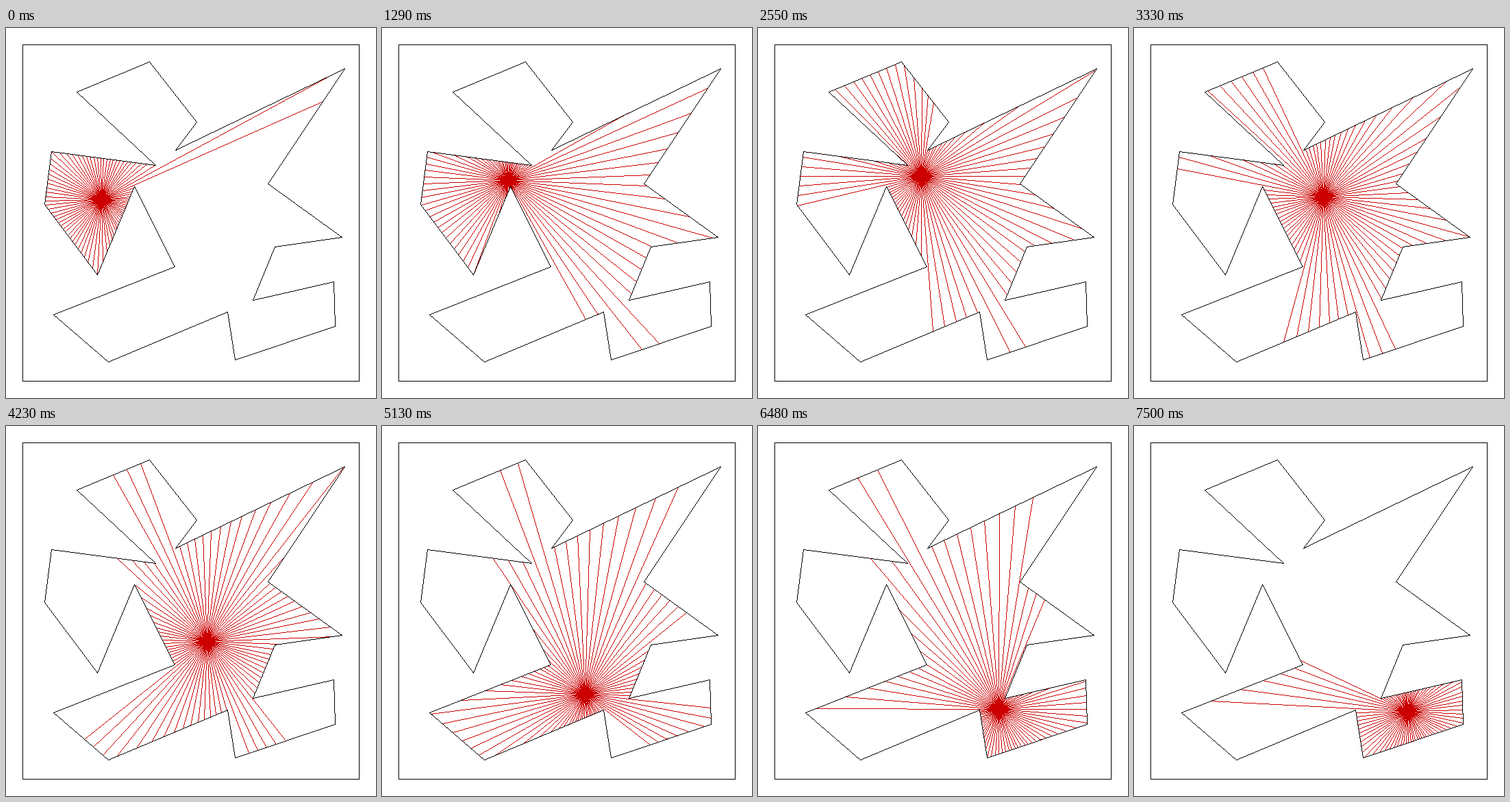
A matplotlib script that plays this animation: 540x540 px, repeating every 7.53 s.

```python
import numpy as np
import matplotlib.pyplot as plt
from matplotlib.animation import FuncAnimation

SIZE, DPI = 540, 100
FRAMES, INTERVAL = 251, 30
RAYS = 80
WHITE, BLACK, RED = (255, 255, 255), (0, 0, 0), (204, 0, 0)

# Corners of the room; the sweep of rays starts toward the first one
ROOM = np.array([
    (133, 360), (56, 257), (66, 180), (218, 200), (103, 93), (209, 49),
    (278, 137), (247, 178), (494, 59), (382, 227), (490, 305), (392, 319),
    (360, 397), (478, 370), (480, 435), (334, 484), (323, 414), (149, 487),
    (69, 418), (246, 348), (187, 231)], float)
EDGES = np.roll(ROOM, -1, axis=0) - ROOM
BORDER = np.array([(24, 24), (515, 24), (515, 515), (24, 515)])

# Key points of the light, evenly spaced in time
WAY = np.array([(139, 250), (182.5, 222.5), (236, 215), (290.5, 271),
                (293, 384.5), (341, 410.5), (399, 416)])
SLOPE = np.gradient(WAY, axis=0)


def cross(a, b):
    return a[..., 0] * b[..., 1] - a[..., 1] * b[..., 0]


def light(frame):
    """Position on a Catmull-Rom curve through the key points."""
    u = frame / (FRAMES - 1) * (len(WAY) - 1)
    i = min(int(u), len(WAY) - 2)
    s = u - i
    blend = s * s * (3 - 2 * s)
    return (WAY[i] * (1 - blend) + WAY[i + 1] * blend
            + s * (1 - s) * ((1 - s) * SLOPE[i] - s * SLOPE[i + 1]))


def cast(p):
    """Points where the rays from p meet the nearest wall."""
    dx, dy = ROOM[0] - p
    a = np.arctan2(dy, dx) + np.arange(RAYS) * 2 * np.pi / RAYS
    d = np.column_stack([np.cos(a), np.sin(a)])
    with np.errstate(divide="ignore", invalid="ignore"):
        det = cross(d[:, None], EDGES)
        dist = cross(ROOM - p, EDGES) / det
        along = cross(ROOM - p, d[:, None]) / det
    hit = (dist > 0) & (along >= -1e-9) & (along <= 1 + 1e-9)
    reach = np.where(hit, dist, np.inf).min(axis=1)
    return p + d * reach[:, None]


def draw_line(img, a, b, color):
    """Hard-edged line, one pixel wide."""
    a, b = np.rint(a), np.rint(b)
    steps = int(np.abs(b - a).max()) + 1
    x, y = np.rint(np.linspace(a, b, steps)).astype(int).T
    img[y, x] = color


def draw_outline(img, corners):
    for a, b in zip(corners, np.roll(corners, -1, axis=0)):
        draw_line(img, a, b, BLACK)


def render(frame):
    img = np.full((SIZE, SIZE, 3), WHITE, np.uint8)
    p = light(frame)
    for end in cast(p):
        draw_line(img, p, end, RED)
    draw_outline(img, ROOM)
    draw_outline(img, BORDER)
    return img


fig = plt.figure(figsize=(SIZE / DPI, SIZE / DPI), dpi=DPI, facecolor="white")
stage = fig.figimage(render(0), origin="upper")


def update(frame):
    stage.set_data(render(frame))
    return [stage]


anim = FuncAnimation(fig, update, frames=FRAMES, interval=INTERVAL,
                     repeat=True, repeat_delay=0, blit=False)
plt.show()
```
